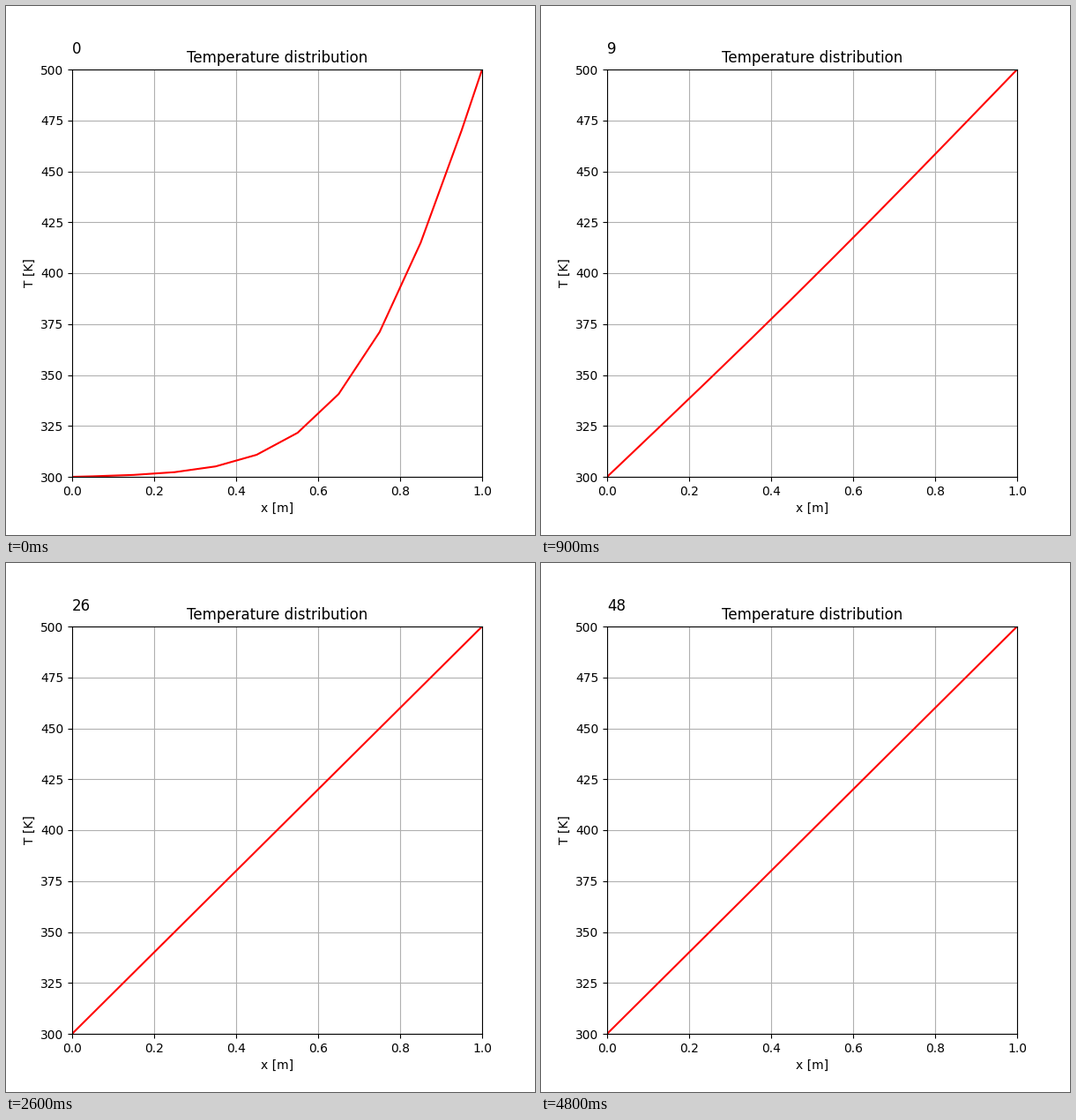
A matplotlib script for the animation above (4900 ms loop, 600 by 600 pixels).

```python
import numpy as np
import matplotlib.pyplot as plt
from matplotlib.animation import FuncAnimation

CELLS = 10
T_LEFT, T_RIGHT = 300.0, 500.0
FOURIER = 0.4          # alpha * dt / dx**2
STEPS_PER_FRAME = 10
FRAMES = 49


def step_matrix():
    """Implicit finite-volume operator with fixed wall temperatures."""
    a = np.eye(CELLS) * (1 + 2 * FOURIER)
    a -= FOURIER * (np.eye(CELLS, k=1) + np.eye(CELLS, k=-1))
    a[0, 0] += FOURIER
    a[-1, -1] += FOURIER
    return a


def solve():
    """Temperature at walls and cell centres for every frame."""
    inv = np.linalg.inv(step_matrix())
    source = np.zeros(CELLS)
    source[0] = 2 * FOURIER * T_LEFT
    source[-1] = 2 * FOURIER * T_RIGHT
    temp = np.full(CELLS, T_LEFT)
    history = []
    for _ in range(FRAMES):
        for _ in range(STEPS_PER_FRAME):
            temp = inv @ (temp + source)
        history.append(np.concatenate(([T_LEFT], temp, [T_RIGHT])))
    return history


x = np.concatenate(([0], (np.arange(CELLS) + 0.5) / CELLS, [1]))
profiles = solve()

fig, ax = plt.subplots(figsize=(6, 6), dpi=100)
ax.set(xlim=(0, 1), ylim=(T_LEFT, T_RIGHT), xlabel="x [m]", ylabel="T [K]",
       title="Temperature distribution")
ax.grid(True)
line, = ax.plot(x, profiles[0], color="red", lw=1.5)
counter = ax.text(0, 1.04, "0", transform=ax.transAxes, fontsize=12)


def update(i):
    line.set_ydata(profiles[i])
    counter.set_text(str(i))
    return line, counter


anim = FuncAnimation(fig, update, frames=FRAMES, interval=100,
                     repeat=True, repeat_delay=0)
plt.show()
```
